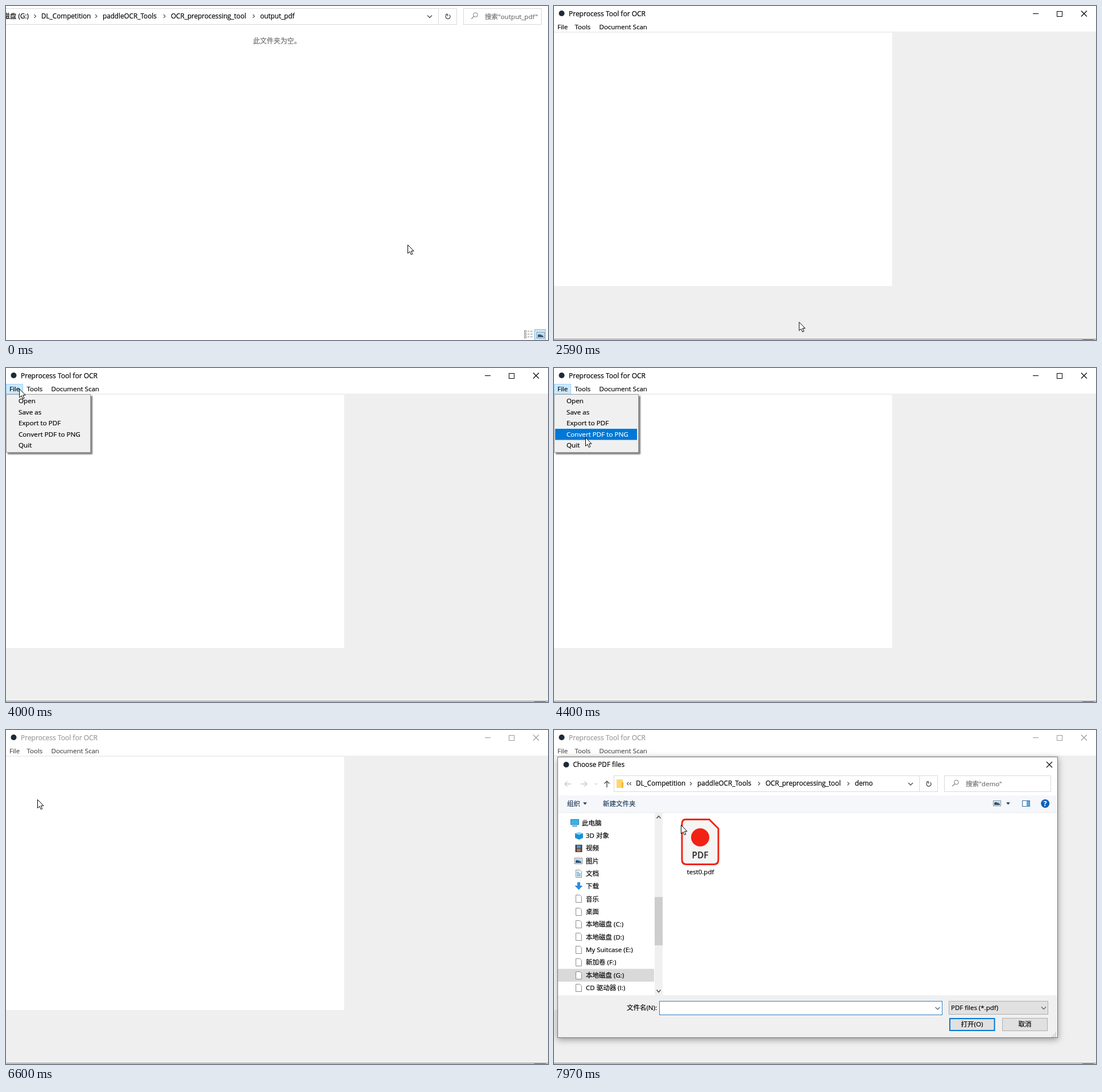
Animation, 953 px wide and 588 px high, one loop 8 s. Source, as an HTML page:

```html
<!DOCTYPE html>
<html lang="zh">
<head>
<meta charset="utf-8">
<title>Preprocess Tool for OCR</title>
<style>
html,body{margin:0;width:100%;height:100%;overflow:hidden;background:#fff}
svg{display:block;width:953px;height:588px}
text{font-family:'Open Sans','Noto Sans CJK SC','Noto Sans CJK',sans-serif;stroke-width:.2}
#menu{filter:drop-shadow(3px 3px 1px rgba(0,0,0,.5))}
#dialog{filter:drop-shadow(0 3px 6px rgba(0,0,0,.38))}
</style>
</head>
<body>
<svg id="stage" viewBox="0 0 953 588"></svg>
<script>
const LOOP = 8000;
const GREY = '#6d6d6d', LINE = '#d9d9d9', BLUE = '#0078d7';

// Markup helpers
const text = (x, y, s, size = 11.7, fill = '#000', anchor = 'start', extra = '') =>
  `<text x="${x}" y="${y}" font-size="${size}" fill="${fill}" stroke="${fill}" text-anchor="${anchor}" ${extra}>${s}</text>`;
const rect = (x, y, w, h, fill, stroke = 'none', extra = '') =>
  `<rect x="${x}" y="${y}" width="${w}" height="${h}" fill="${fill}" stroke="${stroke}" ${extra}/>`;
const path = (d, stroke = '#555', width = 1, fill = 'none') =>
  `<path d="${d}" stroke="${stroke}" stroke-width="${width}" fill="${fill}"/>`;
const dot = (x, y, r, fill) => `<circle cx="${x}" cy="${y}" r="${r}" fill="${fill}"/>`;
const group = (id, body) => `<g id="${id}">${body}</g>`;

const chevron = (x, y) => path(`M${x - 1.5} ${y - 3}l3 3-3 3`, '#555', 1.2);
const caretDown = (x, y, w = 1.5) => path(`M${x - 4} ${y - 2}l4 4 4-4`, '#555', w);
const caretUp = (x, y) => path(`M${x - 3.5} ${y + 2}l3.5-4 3.5 4`, '#555', 1.6);
const triangle = (x, y) => path(`M${x} ${y}h7l-3.5 4z`, 'none', 0, '#1e395b');
const cross = (x, y, s = 10) => path(`M${x} ${y}l${s} ${s}m0 ${-s}l${-s} ${s}`, 'currentColor', 1.1);
const refresh = (x, y) => path(`M${x + 2.5} ${y - 3}a4 4 0 1 1-5 0M${x - 4} ${y - 4}h3.5v3.5`, '#555', 1.4);
const magnifier = (x, y) =>
  `<circle cx="${x}" cy="${y}" r="3.8" fill="none" stroke="#777"/>` + path(`M${x - 2.7} ${y + 2.7}l-4.5 4.5`, '#777', 1.2);
const picture = (x, y, w = 13, h = 10) =>
  rect(x + .5, y + .5, w, h, '#fff', '#7b8794') + rect(x + 2, y + 2, w - 3, h - 3, '#a8d4f2') +
  path(`M${x + 2} ${y + h - 1}v-4l3-1 ${w - 6} 3v2z`, 'none', 0, '#35506b');

const crumbs = (y, items) => items.map(([x, s], i) =>
  text(x, y, s) + (i ? chevron(x - 11.5, y - 3.5) : '')).join('');

function explorer() {
  const marks = [572.5, 577.5, 582.5].map(y =>
    rect(911.5, y - 1, 3, 3, '#fff', '#888') + path(`M917 ${y}h3.5m1.5 0h4`, '#888')).join('');
  return rect(0, 0, 953, 588, '#fff') +
    rect(-2.5, 4.5, 795, 28, '#fff', LINE) + path('M760.5 5V32', LINE) +
    rect(804.5, 4.5, 137, 28, '#fff', LINE) +
    text(40, 21.5, '磁盘 (G:)', 11.7, '#000', 'end') + chevron(51, 18) +
    crumbs(21.5, [[62, 'DL_Competition'], [170, 'paddleOCR_Tools'], [290, 'OCR_preprocessing_tool'], [447, 'output_pdf']]) +
    caretDown(745, 18.5) + refresh(777, 18.5) + magnifier(825.5, 15.5) +
    text(842, 22.5, '搜索"output_pdf"', 11.6, GREY) +
    text(434.5, 65.5, '此文件夹为空。', 12, GREY) +
    marks + rect(929.5, 569.5, 19, 19, '#cce8f8', '#7fb9dc') + picture(933, 574);
}

function app() {
  return rect(0, 0, 953, 588, '#fff') + rect(0, 45, 953, 542, '#efefef') +
    rect(0, 47, 594.5, 446, '#fff') + rect(0, 586, 953, 1, '#707070') + rect(929, 587, 20, 1, '#7fa9cc') +
    dot(13.5, 13, 5, '#1f2a38') +
    group('title', text(26, 17.5, 'Preprocess Tool for OCR', 12, 'currentColor') +
      path('M842 13.5h10', 'currentColor', 1.1) + rect(884.5, 9.5, 9, 9, 'none', 'currentColor') + cross(927, 8.5)) +
    rect(.5, 28.5, 29, 17, '#e5f3ff', '#cce8ff', 'id="file"') +
    group('bar', [[6, 'File'], [36.5, 'Tools'], [79.5, 'Document Scan']]
      .map(([x, s]) => text(x, 41, s, 11.5, 'currentColor')).join(''));
}

const ROW = 19.6;
const menuItems = ['Open', 'Save as', 'Export to PDF', 'Convert PDF to PNG', 'Quit'];
const menu = () => rect(.5, 46.5, 148, 102, '#f0f0f0', '#a0a0a0') +
  menuItems.map((s, i) => text(22, 62 + i * ROW, s, 11.65)).join('');
const pick = () => rect(2, 0, 144, 19.6, BLUE) + text(22, 14, '', 11.65, '#fff', 'start', 'id="pickText"');

function dialogShell() {
  return rect(6.5, 47.5, 879, 494, '#fff', '#7a7a7a') + rect(7, 467, 878, 74, '#f0f0f0') +
    dot(21.5, 61, 5, '#1f2a38') + text(33.5, 65, 'Choose PDF files') + cross(866, 56) +
    rect(177, 145, 14, 322, '#f0f0f0') + rect(177, 294, 14, 85, '#cdcdcd') +
    caretUp(184, 153.5) + path('M180.5 457.5l3.5 4 3.5-4', '#555', 1.6);
}

const skeleton = () => [[127, 481, 54, 16], [185, 478, 498, 24], [694, 478, 175, 23],
  [694, 506, 82, 24], [787, 506, 82, 24], [869, 526, 16, 15]].map(b => rect(...b, '#fff')).join('');

const treeItems = ['此电脑', '3D 对象', '视频', '图片', '文档', '下载', '音乐', '桌面',
  '本地磁盘 (C:)', '本地磁盘 (D:)', 'My Suitcase (E:)', '新加卷 (F:)', '本地磁盘 (G:)', 'CD 驱动器 (I:)'];

function treeIcon(i, y) {
  const page = path(`M38.5 ${y - 6.5}h7l3 3v10h-10z`, '#8a8a8a', 1, '#fff');
  switch (i) {
    case 0: return rect(29.5, y - 5.5, 14, 9, '#35b4ee', '#2c7ca8') + path(`M32 ${y + 6}h9`, '#2c7ca8', 1.5);
    case 1: return path(`M37 ${y - 4}l7-2 7 2v8l-7 3-7-3z`, 'none', 0, '#1a91d6') +
      path(`M37 ${y - 4}l7 2.5 7-2.5-7-2z`, 'none', 0, '#8ed8f5');
    case 2: return rect(37.5, y - 6, 12, 13, '#3b3f45') + rect(40, y - 5, 7, 5, '#4f94cf') + rect(40, y + 1, 7, 5, '#b5764a');
    case 3: return picture(36, y - 5);
    case 4: return page + path(`M40 ${y - 2.5}h4m-4 3h7m-7 3h7`, '#2b95d0', 1.5);
    case 5: return path(`M41 ${y - 7}h5v6h4.5l-7 7.5-7-7.5h4.5z`, 'none', 0, '#2d8ce0');
    default: return page;
  }
}

function dialogContent() {
  const tree = treeItems.map((s, i) => {
    const y = 163.3 + i * 22.35;
    return treeIcon(i, Math.round(y)) + text(i ? 56 : 49, y + 4.2, s, 11.5);
  }).join('');
  const grip = [[881, 533], [881, 536], [881, 539], [878, 536], [878, 539], [875, 539]]
    .map(([x, y]) => rect(x, y, 1.5, 1.5, '#aaa')).join('');
  return path('M30 95H19m4.5-4.5L19 95l4.5 4.5', '#c8c8c8', 1.4) +
    path('M47 95h11m-4.5-4.5L58 95l-4.5 4.5', '#c8c8c8', 1.4) +
    path('M71.5 93.5l2.5 2.5 2.5-2.5', '#c0c0c0') + path('M93 101V90m-4.5 4.5L93 90l4.5 4.5', '#555', 1.5) +
    rect(105.5, 80.5, 569, 28, '#fff', LINE) + path('M642.5 81v27', LINE) +
    rect(110, 87, 11, 15, '#ffd66b') + rect(119, 92, 3, 10, '#f0b93e') +
    path('M131 92l-2.5 2.5 2.5 2.5m4.5-5l-2.5 2.5 2.5 2.5', '#444', 1.1) +
    crumbs(98, [[144, 'DL_Competition'], [252, 'paddleOCR_Tools'], [372, 'OCR_preprocessing_tool'], [529, 'demo']]) +
    caretDown(627, 95) + refresh(659, 95) +
    rect(686.5, 80.5, 187, 28, '#fff', LINE) + magnifier(707.5, 92) + text(724, 98.5, '搜索"demo"', 11.6, GREY) +
    rect(7, 115, 878, 30, '#f5f7fa') + path('M7 145.5h878', '#e9ebee') +
    rect(9.5, 117.5, 57, 24, '#e5f3ff', '#cce8ff', 'id="organise"') +
    text(23, 134, '组织', 11.5, '#1e395b') + triangle(51, 127.5) + text(86, 134, '新建文件夹', 11.5, '#1e395b') +
    picture(772, 124, 13, 9) + triangle(795, 127.5) +
    rect(823.5, 124.5, 13, 10, '#fff', '#3b6f9e') + rect(831, 125, 5.5, 9.5, '#58a8de') +
    dot(863.7, 129.5, 7.5, '#0a63b5') + text(863.7, 133.8, '?', 12, '#fff', 'middle', 'font-weight="700"') +
    rect(7, 420.5, 169, 22.5, '#d9d9d9') + tree +
    path('M231 157.5h42l16 16v55q0 8-8 8h-48q-8 0-8-8v-63q0-8 6-8z', '#f22314', 3, '#f5f5f5') +
    dot(257, 189, 16, '#f22314') + text(257, 226, 'PDF', 15.3, '#333', 'middle', 'font-weight="600"') +
    text(257.5, 254, 'test0.pdf', 11.5, '#000', 'middle') +
    rect(120, 478, 64, 20, '#f0f0f0') + text(181, 493, '文件名(N):', 11.5, '#000', 'end') +
    rect(185.5, 477.5, 497, 24, '#fff', '#2b80c5') + caretDown(674.5, 490, 1.1) +
    rect(190, 482, 1, 16, '#000', 'none', 'id="caret"') +
    rect(692, 503, 180, 30, '#f0f0f0') + rect(869, 526, 16, 15, '#f0f0f0') +
    rect(694.5, 477.5, 174, 23, '#e1e1e1', '#adadad') + text(698, 493, 'PDF files (*.pdf)', 11.5) + caretDown(861, 489.5, 1.1) +
    rect(696, 508, 78.5, 21, '#e1e1e1', BLUE, 'stroke-width="2"') + text(735, 522, '打开(O)', 11.5, '#000', 'middle') +
    rect(788.5, 507.5, 79, 22, '#e1e1e1', '#adadad') + text(828, 522, '取消', 11.5, '#000', 'middle') + grip;
}

const stage = document.getElementById('stage');
stage.innerHTML = group('explorer', explorer()) + group('app', app()) +
  group('menu', menu()) + group('pick', pick()) +
  group('dialog', dialogShell() + group('skeleton', skeleton()) + group('content', dialogContent())) +
  `<circle id="click" r="11" fill="#ffee00"/>` +
  group('cursor', path('M.5.5V15.5L4 12.3 6.3 17.7 8.8 16.7 6.5 11.3H11z', '#000', 1, '#fff'));

const el = Object.fromEntries([...stage.querySelectorAll('[id]')].map(n => [n.id, n]));

// Pointer route: time, x, y
const route = [[0, 706, 420], [20, 706, 420], [115, 638, 352], [250, 638, 352], [260, 637, 351], [1225, 637, 351],
  [1425, 633, 592], [2250, 633, 620], [2560, 434, 590], [2590, 431, 557], [2770, 356, 386], [2960, 66, 48],
  [3070, 21, 31], [3120, 21, 31], [3240, 17, 22], [3380, 22, 33], [3985, 22, 33], [4395, 55, 122],
  [7810, 55, 122], [7965, 223, 167], [LOOP, 223, 167]];

const clamp = v => Math.max(0, Math.min(1, v));
const ramp = (t, a, b) => clamp((t - a) / (b - a));

function pointer(t) {
  const i = route.findIndex(k => k[0] > t);
  const [a, b] = [route[i - 1], route[i]];
  const p = ramp(t, a[0], b[0]);
  return [a[1] + (b[1] - a[1]) * p, a[2] + (b[2] - a[2]) * p];
}

const show = (node, opacity) => {
  node.style.display = opacity > 0 ? '' : 'none';
  node.setAttribute('opacity', +opacity);
};

function render(t) {
  const [x, y] = pointer(t);
  el.cursor.setAttribute('transform', `translate(${x} ${y})`);

  show(el.explorer, t < 2250);
  show(el.app, t >= 2250);

  const open = t >= 3440 && t < 6340;
  const hover = t > 2590 && t < 6340 && x < 30 && y > 27 && y < 46;
  show(el.file, open || hover);
  el.file.setAttribute('fill', open ? '#cce8ff' : '#e5f3ff');
  el.file.setAttribute('stroke', open ? '#99d1ff' : '#cce8ff');
  show(el.menu, open ? ramp(t, 3410, 3530) : 0);

  const row = Math.min(4, Math.floor((y - 48) / ROW));
  const picked = t > 3985 && t < 6600 && row >= 0;
  show(el.pick, picked ? 1 - ramp(t, 6340, 6600) : 0);
  if (picked) {
    el.pick.setAttribute('transform', `translate(0 ${48.2 + row * ROW})`);
    el.pickText.textContent = menuItems[row];
  }

  const inactive = t >= 6480;
  el.title.setAttribute('color', inactive ? '#999' : '#000');
  el.bar.setAttribute('color', inactive ? '#4d4d4d' : '#000');

  const first = t >= 3410 && t < 3530, second = t >= 6200 && t < 6480;
  show(el.click, first ? .65 * (1 - ramp(t, 3450, 3530)) : second ? .65 * (1 - ramp(t, 6330, 6480)) : 0);
  el.click.setAttribute('cx', first ? 22 : 55);
  el.click.setAttribute('cy', first ? 33 : 122);

  const p = ramp(t, 6950, 7420);
  const grow = 1 - (1 - p) ** 2;
  const scale = .9 + .1 * grow;
  show(el.dialog, grow);
  el.dialog.setAttribute('transform', `translate(446 294.5) scale(${scale}) translate(-446 -294.5)`);
  show(el.skeleton, t < 7400);
  show(el.content, t >= 7400);
  show(el.organise, t >= 7430 && t < 7850);
  show(el.caret, t >= 7430 && t < 7950);
}

const start = performance.now();
function tick() {
  render((performance.now() - start) % LOOP);
  requestAnimationFrame(tick);
}
tick();
</script>
</body>
</html>
```
